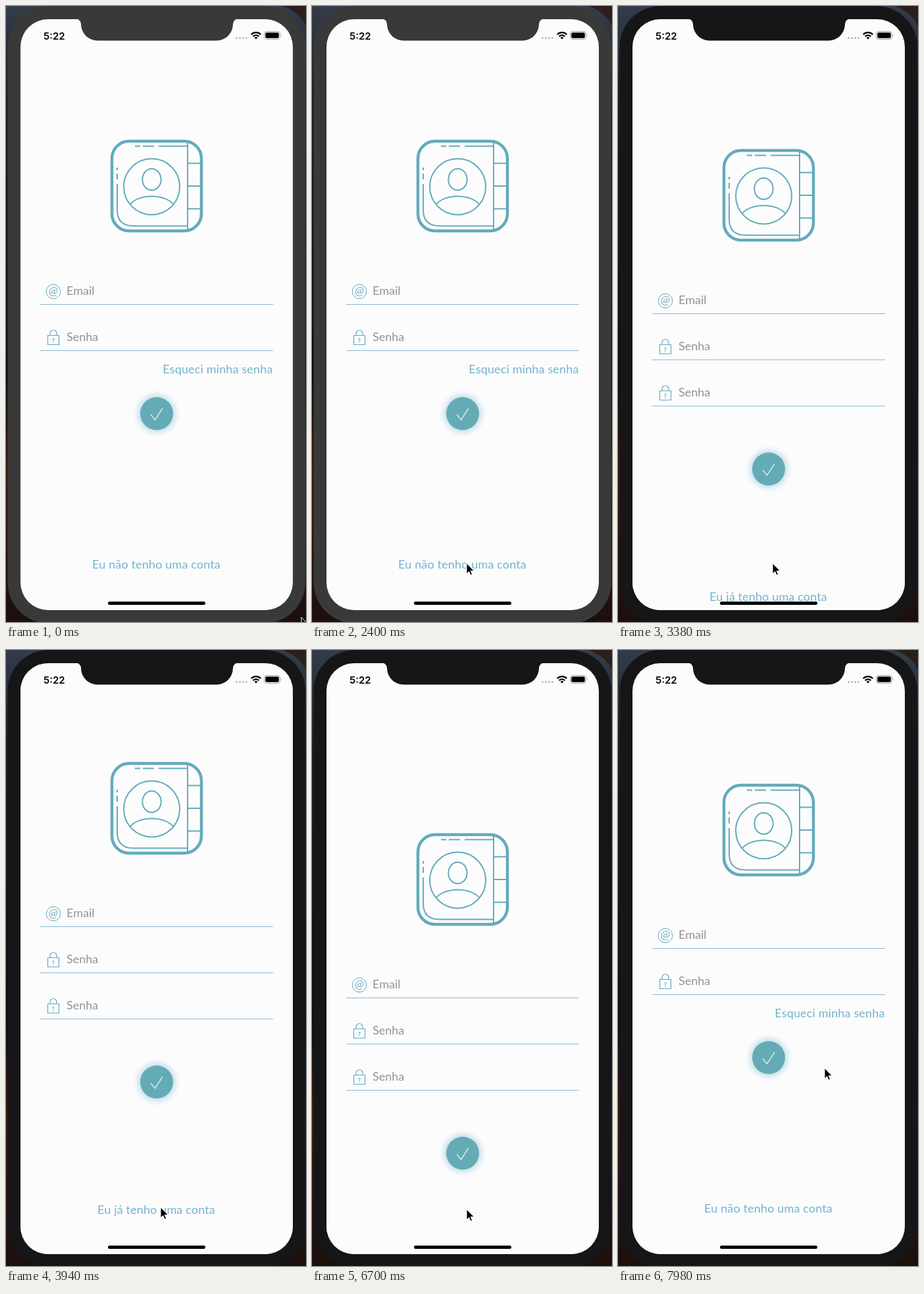
An HTML page for the animation above (8 s loop, 456 by 934 pixels).

```html
<!DOCTYPE html>
<html lang="pt">
<head>
<meta charset="utf-8">
<title>Login</title>
<style>
  html, body { margin: 0; width: 100%; height: 100%; overflow: hidden; background: #111; }
  svg { display: block; width: 456px; height: 934px; }
  text { font: 18px Lato, "Open Sans", sans-serif; letter-spacing: .15px; }
  .line { fill: none; stroke: #63abbc; }
  .rule { stroke: #88bcd4; }
  .label { fill: #929292; letter-spacing: 0; }
  .link { fill: #74b3cb; }
  .mark { fill: #76adbb; }
  .clock { font: 600 15px Inter, Roboto, sans-serif; letter-spacing: 0; }
</style>
</head>
<body>
<svg viewBox="0 0 456 934">
  <defs>
    <linearGradient id="wall" x2="0" y2="1">
      <stop offset="0" stop-color="#343c4a"/>
      <stop offset=".15" stop-color="#16202a"/>
      <stop offset=".6" stop-color="#100c0c"/>
      <stop offset=".75" stop-color="#3a1a0c"/>
      <stop offset="1" stop-color="#1c0f0c"/>
    </linearGradient>
    <radialGradient id="glow">
      <stop offset=".6" stop-color="#c6dfe8"/>
      <stop offset=".78" stop-color="#e9f2f7"/>
      <stop offset="1" stop-color="#fcfcfd" stop-opacity="0"/>
    </radialGradient>
    <clipPath id="glass"><rect x="22" y="20" width="414" height="896" rx="42"/></clipPath>

    <g id="book" class="line" stroke-width="2">
      <rect x="161" y="205" width="136" height="136" rx="26" stroke-width="4.5"/>
      <path d="M276 206V340M276 238.5h21M276 273h21M276 307.5h21"/>
      <path d="M196 212.5h8M208 212.5h17M232 212.5h44M169 245v4M169 254v9M169 270v39Q169 333.5 194 333.5H276"/>
      <circle cx="221.5" cy="274" r="42.5"/>
      <ellipse cx="221.5" cy="263" rx="14.2" ry="16.3"/>
      <path d="M188.5 301A36 21 0 0 1 254.5 301"/>
    </g>

    <!-- Field icons and the button are drawn around their own vertical centre. -->
    <g id="at">
      <circle class="line" cx="72" cy="1" r="10.8"/>
      <text class="mark" x="72" y="6" text-anchor="middle" style="font-style:italic">@</text>
    </g>
    <g id="lock">
      <path class="line" stroke-width="1.2" d="M63.5 -2.5h17v14h-17zM67 -2.5v-3a5 5 0 0 1 10 0v3"/>
      <text class="mark" x="72" y="8.5" text-anchor="middle" style="font-size:10px;font-weight:700">?</text>
    </g>
    <g id="button">
      <circle cx="229" r="39" fill="url(#glow)"/>
      <circle cx="229" r="25" fill="#64abb5"/>
      <path d="M220 1.5l6.5 8L238 -8" fill="none" stroke="#d3e9ec" stroke-width="1.5"/>
    </g>
  </defs>

  <rect width="456" height="934" fill="url(#wall)"/>
  <path d="M420 0H456V30Q445 8 420 0Z" fill="#2a1f1c"/>
  <g id="bezel">
    <rect x="2.5" y="0" width="452.5" height="936" rx="62"/>
    <g clip-path="url(#glass)">
      <rect x="22" y="20" width="414" height="896" fill="#fcfcfd"/>
      <g id="login"></g>
      <g id="signup"></g>
    </g>
    <path d="M106 19.5A8 8 0 0 1 114 27.5A25 25 0 0 0 139 52.5H320A25 25 0 0 0 345 27.5A8 8 0 0 1 353 19.5Z"/>
  </g>

  <text class="clock" x="57" y="50.5">5:22</text>
  <g fill="#b9b9bb">
    <circle cx="350.5" cy="48.5" r="1.5"/><circle cx="355.5" cy="48.5" r="1.5"/>
    <circle cx="360.5" cy="48.5" r="1.5"/><circle cx="365.5" cy="48.5" r="1.5"/>
  </g>
  <g fill="none" stroke="#000" stroke-width="2.3">
    <path d="M372.8 43.2a10.2 10.2 0 0 1 14.4 0M375.6 46.2a6.2 6.2 0 0 1 8.8 0"/>
    <path d="M377.6 47.9L380 50.5L382.4 47.9Q380 46.2 377.6 47.9Z" fill="#000" stroke="none"/>
  </g>
  <rect x="392.5" y="38.5" width="24" height="12" rx="3.5" fill="none" stroke="#a5a5a7"/>
  <rect x="394.2" y="40.2" width="20.6" height="8.6" rx="2"/>
  <path d="M418 42.5q1.5 2 0 4z" fill="#a5a5a7"/>
  <rect x="155" y="903" width="148" height="5" rx="2.5"/>
  <path id="cursor" d="M0 0V16L3.7 12.6L6 18L8.6 16.9L6.3 11.6H11.4Z" stroke="#fff"/>
</svg>

<script>
const $ = id => document.getElementById(id);

const field = (icon, label, y) => `
  <use href="#${icon}" y="${y}"/>
  <text class="label" x="92" y="${y + 6}">${label}</text>
  <path class="rule" d="M52 ${y + 20.5}H406"/>`;

const link = (label, x, y, anchor) =>
  `<text class="link" x="${x}" y="${y}" text-anchor="${anchor}">${label}</text>`;

$('login').innerHTML = `
  <use href="#book"/>
  ${field('at', 'Email', 432)}
  ${field('lock', 'Senha', 502)}
  ${link('Esqueci minha senha', 405.5, 557, 'end')}
  <use href="#button" y="618"/>
  ${link('Eu não tenho uma conta', 228.5, 853, 'middle')}`;

$('signup').innerHTML = `
  <rect x="22" y="20" width="414" height="896" fill="#fcfcfd"/>
  <use href="#book" y="-35"/>
  ${field('at', 'Email', 397)}
  ${field('lock', 'Senha', 467)}
  ${field('lock', 'Senha', 537)}
  <use href="#button" y="653"/>
  ${link('Eu já tenho uma conta', 228.5, 853, 'middle')}`;

const LOOP = 8000, HEIGHT = 896, OPEN = 57.75, CLOSE = 141.02;

// Steps last 20, 100 and 20 ms in turn, so motion runs on the step count.
function stepAt(t) {
  const rest = t % 140;
  return 3 * Math.floor(t / 140) + (rest < 20 ? 0 : rest < 120 ? 1 : 2);
}

// Critically damped spring: the share of the way still to go.
function spring(steps) {
  const u = 0.304 * Math.max(0, steps);
  return (1 + u) * Math.exp(-u);
}

// Pointer stops: step, x, y.
const stops = [[3, 449, 927], [40, 235, 845], [85, 235, 845],
               [109, 234, 848], [146, 235, 848], [171, 314, 634]];

function pointerAt(n) {
  let i = 0;
  while (i < stops.length - 2 && n > stops[i + 1][0]) i++;
  const [a, b] = [stops[i], stops[i + 1]];
  const p = Math.min(1, Math.max(0, (n - a[0]) / (b[0] - a[0])));
  const e = p * p * (3 - 2 * p);
  return [a[1] + (b[1] - a[1]) * e, a[2] + (b[2] - a[2]) * e];
}

function draw() {
  const n = stepAt(performance.now() % LOOP);
  const y = HEIGHT * (n < CLOSE ? spring(n - OPEN) : 1 - spring(n - CLOSE));
  $('signup').setAttribute('transform', `translate(0 ${Math.round(y)})`);
  $('cursor').setAttribute('transform', `translate(${pointerAt(n).map(Math.round)})`);
  $('bezel').setAttribute('fill', n < OPEN ? '#393939' : '#161618');
  requestAnimationFrame(draw);
}
draw();
</script>
</body>
</html>
```
